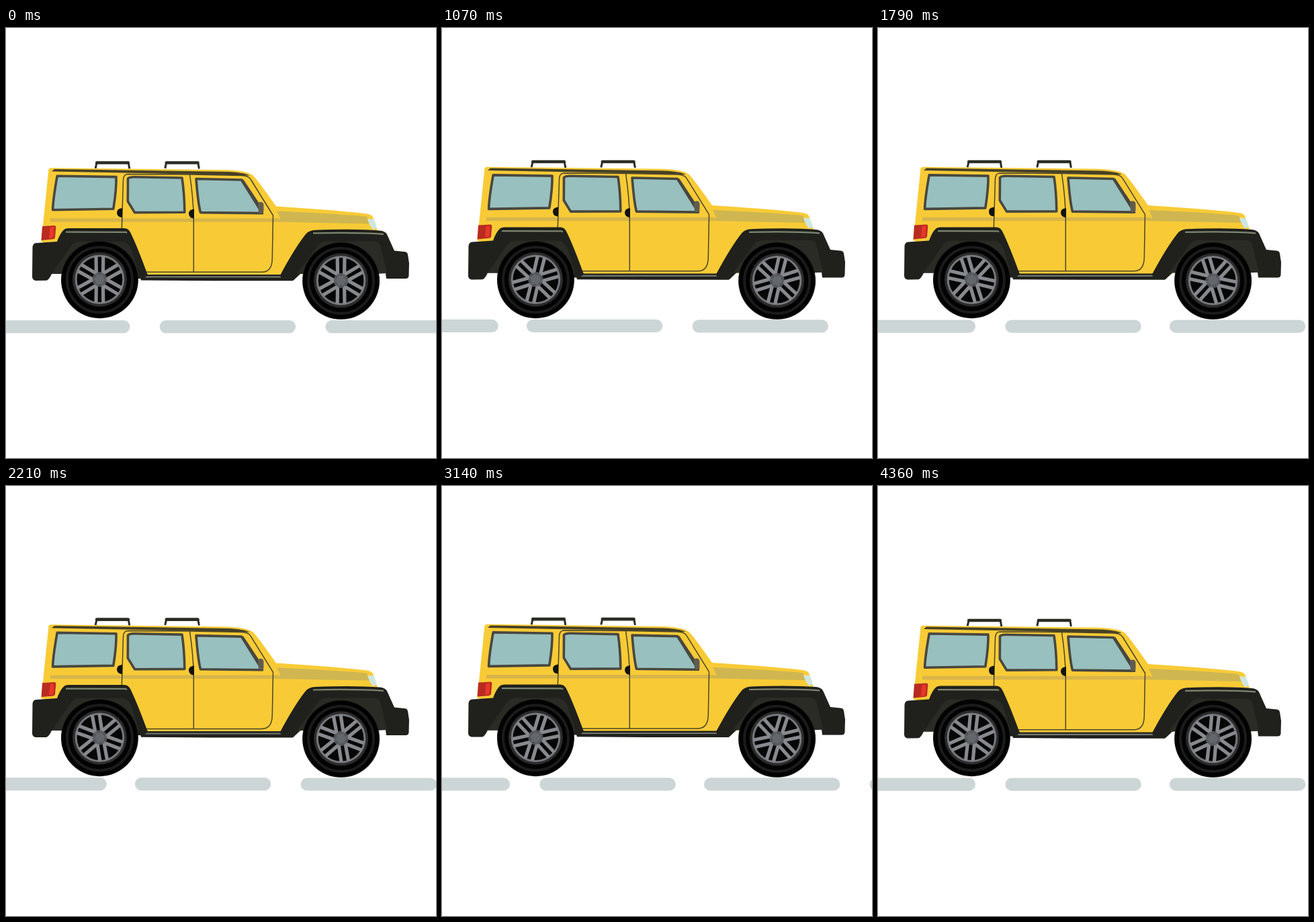
An HTML page with a canvas that plays this animation: 640 px wide and 640 px high, repeating every 4.43 s.

```html
<!DOCTYPE html>
<html lang="en">
<head>
<meta charset="utf-8">
<title>Yellow off-roader</title>
<style>
html, body { margin: 0; width: 100%; height: 100%; overflow: hidden; background: #fff; }
canvas { display: block; width: 100vmin; height: 100vmin; }
</style>
</head>
<body>
<canvas id="stage"></canvas>
<script>
const canvas = document.getElementById('stage');
const ctx = canvas.getContext('2d');
const scale = Math.max(1, window.devicePixelRatio || 1);
canvas.width = canvas.height = 640 * scale;

const LOOP = 4430;
const DARK = '#20211c', SEAM = '#4c4526', YELLOW = '#f8cb36';

function fill(d, color) {
  ctx.fillStyle = color;
  ctx.fill(new Path2D(d));
}

function line(d, color, width, cap = 'butt') {
  ctx.strokeStyle = color;
  ctx.lineWidth = width;
  ctx.lineCap = cap;
  ctx.lineJoin = 'round';
  ctx.stroke(new Path2D(d));
}

function disc(r, color) {
  ctx.fillStyle = color;
  ctx.beginPath();
  ctx.arc(0, 0, r, 0, Math.PI * 2);
  ctx.fill();
}

function ring(r, color, width) {
  ctx.strokeStyle = color;
  ctx.lineWidth = width;
  ctx.beginPath();
  ctx.arc(0, 0, r, 0, Math.PI * 2);
  ctx.stroke();
}

function pane(d) {
  fill(d, '#98c0bf');
  line(d, '#48473f', 3.6);
}

// Five dashes slide left, then the strip starts over.
function road(step) {
  const phase = step % 32;
  ctx.fillStyle = '#cdd6d7';
  for (let i = 0; i < 5; i++) {
    const x = -18 - 22 * phase + 246.7 * i - (i > 2 ? 2.2 : 0);
    const y = 435 - 0.042 * phase + (i > 3 ? 0.4 : 0);
    ctx.beginPath();
    ctx.roundRect(x, y, 202.4, 19.2, 9.6);
    ctx.fill();
  }
}

function rack(x, y) {
  line(`M${x} ${y + 8.4}L${x + 1.8} ${y}H${x + 49}L${x + 50.6} ${y + 9}`, '#2a2d24', 3);
  line(`M${x + 2} ${y}H${x + 48.6}`, '#2a2d24', 4.6, 'round');
}

function body() {
  rack(133.2, 200.5);
  rack(236.8, 200.5);

  // shell
  fill('M63.5 210Q64.5 208.2 68 208.2L330 211.3Q358 212.5 367 219Q373 224 402 265.5' +
       'Q480 270.3 533 276Q544 277 546 281L553 302L520 345L425 370H200L100 335L52.5 318Z', YELLOW);
  fill('M66 283.3H406V288.8H66Z', '#d8b548');
  fill('M403 272.5Q480 275.5 537 280.5L541 291.5Q470 290 404 288.8L408 283Z', '#cfb650');

  // roof edge and seams
  fill('M72 210L330 214Q354 215 363 219.5L357 219.5L200 216L68 213.5Z', '#454027');
  line('M172.3 299L174.5 226Q175 217.6 181 217.4L274 218L350 219.4Q361 219.6 364 225' +
       'L397.5 279L396.3 343Q396 363.3 381 363.3H208', SEAM, 1.5);
  line('M273.5 218Q279 255 279.3 285V363.3', SEAM, 1.5);

  pane('M76.2 220.3L164 221.6Q164.5 240 159.8 269.3L69.6 270.8Q70 255 76.2 220.3Z');
  pane('M181.5 224Q184 221.7 190 221.7L262 223Q265.5 246 265.8 274.3L191.5 274.6L181.3 258Z');
  pane('M283 224.5L350.5 226L381.5 275.6L289.5 274.6Q286 262 283 224.5Z');
  line('M351.5 226.5L379 268', '#48473f', 4.2);
  fill('M375 262Q375 259 379 259Q383.5 259 383.5 264V272Q383.5 276 378.5 276L376 274Z', '#615c50');

  // handles
  fill('M173 268Q165 268.5 165 275Q165.5 282 173 282Z', '#12120f');
  fill('M280 269.5Q272 270 272 276.5Q272.5 283 280 283.5Z', '#12120f');

  // lamps
  fill('M54 295L72 294Q74.5 294 74.3 297L73 312Q72.8 314 70 314.3L52.5 316Z', '#b92b20');
  fill('M65.5 297L71.5 296Q71.5 306 70 312.5L64 313Z', '#e8372b');
  fill('M538 284L547 284.5Q551 291 551.5 298L546 300Q541 294 538 284Z', '#cfe6df');

  // sill
  fill('M198 365L207 362.5L211 367H432L427 376.3H307L201 375.6Z', DARK);
  line('M203 370.4H424', '#737870', 2.2);

  // rear fender and bumper
  fill('M39.5 326Q40 320.5 45 320L76 318Q81 304 87 299.5Q89 298 93 298H176' +
       'Q182 298 185 304Q195 324 211 368L205 373H195L176 335L120 330L87 366H68' +
       'Q64 375 60 375.8L44 376Q39 375 39 370Z', DARK);
  fill('M68 366L97 324Q102 318 110 318H174Q185 320 190 340L198 366Z', '#2b2b25');
  line('M89 303.6L178 303.8L180 305', '#7d8672', 2.2);

  // front fender and bumper
  fill('M408 368Q430 327 446 307Q451 301 460 300.8Q520 298.5 556 301.5Q564 302 567 307' +
       'L578 331.5L593 333Q597 333 598 337L600 350L599.5 369Q599 373 595 373H566L565 365H555' +
       'L530 336H470L428 375.5L410 374Z', DARK);
  fill('M433 366L465 323Q469 317.5 478 317.5H548Q555 318 557 323L567 365L550 366Z', '#2b2b25');
  line('M457 305.4Q520 303.8 562 306.8', '#7d8672', 2.2);
}

function wheel(x, y, angle) {
  ctx.save();
  ctx.translate(x, y);
  disc(57.5, '#171816');
  disc(56.6, '#020202');
  ring(48.5, '#1b1b1b', 4);
  ctx.translate(0, -0.5);
  disc(40.5, '#2c2c2c');
  disc(36.8, '#75787c');
  disc(33.8, '#060606');
  ctx.rotate(angle);
  for (let i = 0; i < 6; i++) {
    line('M-5 -8L-5.4 -34.5M5 -8L5.4 -34.5', '#87898e', 5.2);
    ctx.rotate(Math.PI / 3);
  }
  disc(10.6, '#5c5f64');
  for (let i = 0; i < 6; i++) {
    ctx.fillStyle = '#505358';
    ctx.beginPath();
    ctx.arc(0, -9, 2.4, 0, Math.PI * 2);
    ctx.fill();
    ctx.rotate(Math.PI / 3);
  }
  disc(7, '#63666b');
  ctx.restore();
}

function draw(time) {
  // 14 pictures a second, taken from motion running at 25 steps a second
  const tick = Math.floor((time % LOOP + 5) * 0.014) % 62;
  const step = Math.max(0, Math.ceil(tick * 25 / 14 - 0.2));
  const lift = 0.48 * (6 - Math.abs(step % 12 - 6));
  const angle = step / 31 * Math.PI * 2;

  ctx.setTransform(scale, 0, 0, scale, 0, 0);
  ctx.fillStyle = '#fff';
  ctx.fillRect(0, 0, 640, 640);
  road(step);
  ctx.save();
  ctx.translate(0, -lift);
  body();
  ctx.restore();
  wheel(139.4, 374.7, angle);
  wheel(498.6, 376.3, angle);
}

const start = performance.now();
function loop() {
  draw(performance.now() - start);
  requestAnimationFrame(loop);
}
loop();
</script>
</body>
</html>
```
